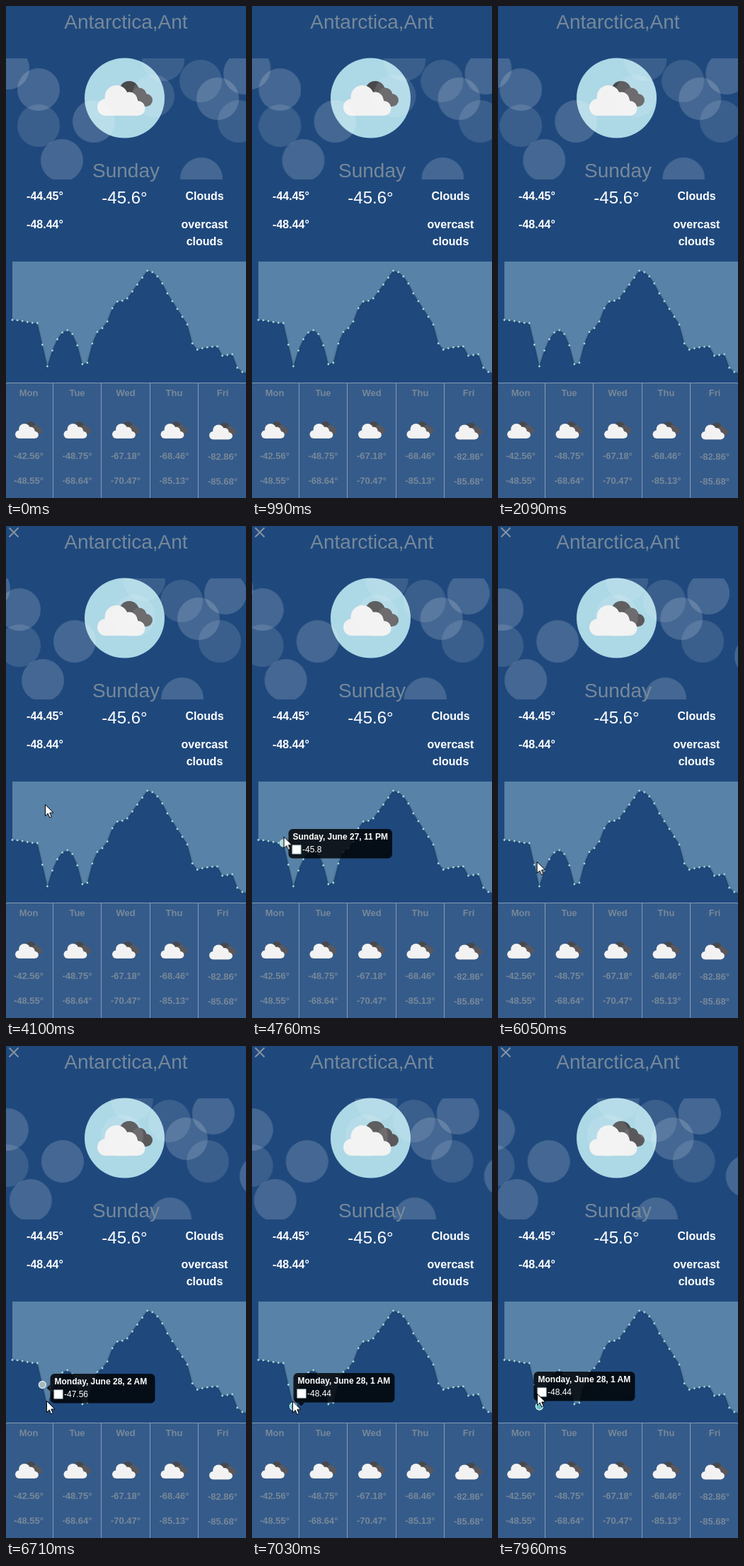
Animation, 339 px wide and 695 px high, one loop 7.99 s. Source, as an HTML page:

```html
<!DOCTYPE html>
<html lang="en">
<head>
<meta charset="utf-8">
<title>Weather</title>
<style>
  html, body { margin: 0; width: 100%; height: 100%; overflow: hidden; background: #1f497d; }
  svg { display: block; font-family: "Liberation Sans", Arial, sans-serif; }
  .head { font-size: 28px; fill: #778899; text-anchor: middle; }
  .now { font-size: 24px; fill: #fff; text-anchor: middle; }
  .side { font-size: 16px; font-weight: bold; fill: #fff; text-anchor: middle; }
  .day { font-size: 13px; font-weight: bold; fill: #778899; text-anchor: middle; }
  .tip { font-size: 12px; fill: #fff; }
  .tip .title { font-weight: bold; }
</style>
</head>
<body>
<svg width="339" height="695" viewBox="0 0 339 695">
  <defs>
    <clipPath id="strip"><rect y="74" width="339" height="171"/></clipPath>
    <g id="cloud">
      <g fill="#49484a">
        <circle cx="45" cy="14" r="14"/>
        <g fill="#5a585b"><circle cx="59" cy="20" r="10.5"/><circle cx="69" cy="27" r="9"/><rect x="46" y="22" width="23" height="14"/></g>
      </g>
      <g fill="#f2f2f2">
        <circle cx="12" cy="37" r="12"/><circle cx="27" cy="22.5" r="16.5"/>
        <circle cx="45" cy="27" r="11.5"/><circle cx="57" cy="38.5" r="10.5"/>
        <rect x="12" y="26" width="45" height="23"/>
      </g>
    </g>
  </defs>

  <text class="head" x="169.5" y="32">Antarctica,Ant</text>
  <circle cx="167.5" cy="130" r="56.5" fill="lightblue"/>
  <use href="#cloud" x="129" y="106"/>
  <g clip-path="url(#strip)"><g id="bubbles" fill="#fff"></g></g>
  <text class="head" x="169.5" y="242">Sunday</text>
  <text class="now" x="167.5" y="279">-45.6°</text>
  <g class="side">
    <text x="55" y="274">-44.45°</text><text x="55" y="314">-48.44°</text>
    <text x="280.5" y="274">Clouds</text><text x="280.5" y="314">overcast</text><text x="280.5" y="338">clouds</text>
  </g>

  <g id="chart"></g>
  <rect y="532" width="339" height="163" fill="#355b8a"/>
  <g id="days"><path d="M0 532.5H339" stroke="#869bb5"/></g>
  <g id="tips"></g>
  <path id="close" d="M4.5 2.5L17.5 15.5M17.5 2.5L4.5 15.5" stroke="#8a95a3" stroke-width="1.8"/>
  <path id="cursor" d="M.5 .5V16.5L4.2 13L6.7 18.8L9.3 17.7L6.8 12H12Z" fill="#fff" stroke="#000"/>
</svg>
<script>
const LOOP = 7990;
const $ = id => document.getElementById(id);

function add(parent, tag, attrs, text) {
  const el = document.createElementNS("http://www.w3.org/2000/svg", tag);
  for (const k in attrs) el.setAttribute(k, attrs[k]);
  if (text) el.textContent = text;
  return parent.appendChild(el);
}

// steps: [time, value]; a repeated time is a hard change
function play(el, prop, steps) {
  const all = [[0, steps[0][1]], ...steps, [LOOP, steps[steps.length - 1][1]]];
  el.animate(all.map(([t, v]) => ({ offset: t / LOOP, [prop]: v })),
    { duration: LOOP, iterations: Infinity });
}
const move = (el, steps) => play(el, "transform", steps.map(([t, x, y]) => [t, `translate(${x}px, ${y}px)`]));
const fade = (el, steps) => play(el, "opacity", steps);

// Two layers of bubbles drifting left together
function bubbles(opacity, centers) {
  centers.forEach(([cx, cy]) => add($("bubbles"), "circle", { cx, cy, r: 30, opacity }));
}
bubbles(.17, [[3, 88], [46, 118], [79, 218], [124, 163], [299, 131], [337, 95], [276, 244], [404, 184]]);
bubbles(.12, [[46, 169], [208, 127], [222, 76], [275, 106], [329, 163]]);
move($("bubbles"), [[0, 0, 0], [LOOP, -52.6, 0]]);

// Hourly curve: turning points joined by easings
const ease = {
  line: u => u,
  in: u => u * u,
  out: u => 1 - (1 - u) ** 2,
  both: u => (1 - Math.cos(Math.PI * u)) / 2
};
const turns = [[0, 443.5], [5, 448, "both"], [7, 509, "line"], [11, 458, "out"], [14, 506, "in"],
  [15, 504, "line"], [18, 455, "out"], [21, 417.5, "both"], [23, 413, "in"], [27, 374, "line"],
  [31, 406, "in"], [35, 450, "line"], [37, 485.5, "out"], [41, 481, "out"], [42, 494, "line"],
  [44, 492, "line"], [45, 511, "line"], [47, 519, "out"]];
function height(hour) {
  const i = Math.max(1, turns.findIndex(turn => turn[0] >= hour));
  const [h0, y0] = turns[i - 1], [h1, y1, kind] = turns[i];
  return y0 + (y1 - y0) * ease[kind]((hour - h0) / (h1 - h0));
}
const points = Array.from({ length: 48 }, (_, hour) => [9 + hour * 7.06, height(hour)]);
const line = "M" + points.map(p => p.join(" ")).join("L");
add($("chart"), "path", { d: line + "V361H9Z", fill: "lightblue", opacity: .4 });
add($("chart"), "path", { d: line, fill: "none", stroke: "#000", "stroke-opacity": .1, "stroke-width": 3 });
points.forEach(([cx, cy]) => add($("chart"), "circle", { cx, cy, r: 1.4, fill: "#a5d8de" }));

// Forecast
[["Mon", "-42.56°", "-48.55°"], ["Tue", "-48.75°", "-68.64°"], ["Wed", "-67.18°", "-70.47°"],
 ["Thu", "-68.46°", "-85.13°"], ["Fri", "-82.86°", "-85.68°"]]
  .forEach(([name, high, low], i, days) => {
    const x = 32 + 68.5 * i;
    const isLast = i === days.length - 1;
    const drop = isLast ? 1 : 0;
    const label = (y, text) => add($("days"), "text", { class: "day", x, y }, text);
    label(551, name);
    add($("days"), "use", { href: "#cloud", transform: `translate(${x - 19} ${587 + 1.5 * drop}) scale(.487)` });
    label(640 + drop, high);
    label(675 + drop, low);
    if (!isLast) add($("days"), "path", { d: `M${66.5 + Math.round(68.3 * i)} 532V695`, stroke: "#869bb5" });
  });

function tooltip({ x, y, w, hour, title, value, fill, ring, below, opacity }) {
  const [cx, cy] = points[hour], h = 41.5;
  const mark = add($("tips"), "circle", { cx, cy, r: 5, fill, stroke: ring, "stroke-width": 1.4 });
  const g = add($("tips"), "g", { class: "tip" });
  const box = add(g, "g", { fill: "#000", opacity: .82 });
  add(box, "rect", { x, y, width: w, height: h, rx: 6 });
  add(box, "path", { d: below ? `M${x + 6} ${y + h}h10l-5 5Z` : `M${x} ${y + 15}l-5 5l5 5Z` });
  add(g, "text", { class: "title", x: x + 6, y: y + 15 }, title);
  add(g, "rect", { x: x + 5.5, y: y + 23, width: 12, height: 12, fill: "#fff", stroke: ring });
  add(g, "text", { x: x + 19.5, y: y + 33 }, value);
  fade(g, opacity);
  fade(mark, opacity);
  return g;
}

tooltip({ x: 51.5, y: 428, w: 146.5, hour: 5, title: "Sunday, June 27, 11 PM", value: "-45.8",
  fill: "#add8dc", ring: "#b9dcdf", opacity: [[4500, 0], [4680, 1], [5800, 1], [6000, 0]] });
tooltip({ x: 62.5, y: 463, w: 148, hour: 6, title: "Monday, June 28, 2 AM", value: "-47.56",
  fill: "#a9b8bf", ring: "#d3e6e8", opacity: [[6180, 0], [6360, 1], [6930, 1], [6930, 0]] });
const last = tooltip({ x: 50.5, y: 460, w: 143, hour: 7, title: "Monday, June 28, 1 AM", value: "-48.44",
  fill: "#62c3c8", ring: "#d9eef0", below: true, opacity: [[6930, 0], [6930, 1]] });
move(last, [[6930, 12, 3], [7230, 0, 0]]);

const enter = 3500;
fade($("close"), [[enter, 0], [enter, 1]]);
fade($("cursor"), [[enter, 0], [enter, 1]]);
move($("cursor"), [[enter, 0, 428], [4100, 55, 393], [4700, 45, 438], [5600, 38, 447],
  [5840, 55, 469], [6400, 54, 482], [6710, 57, 501], [7400, 57, 502], [7960, 55, 491]]);
</script>
</body>
</html>
```
